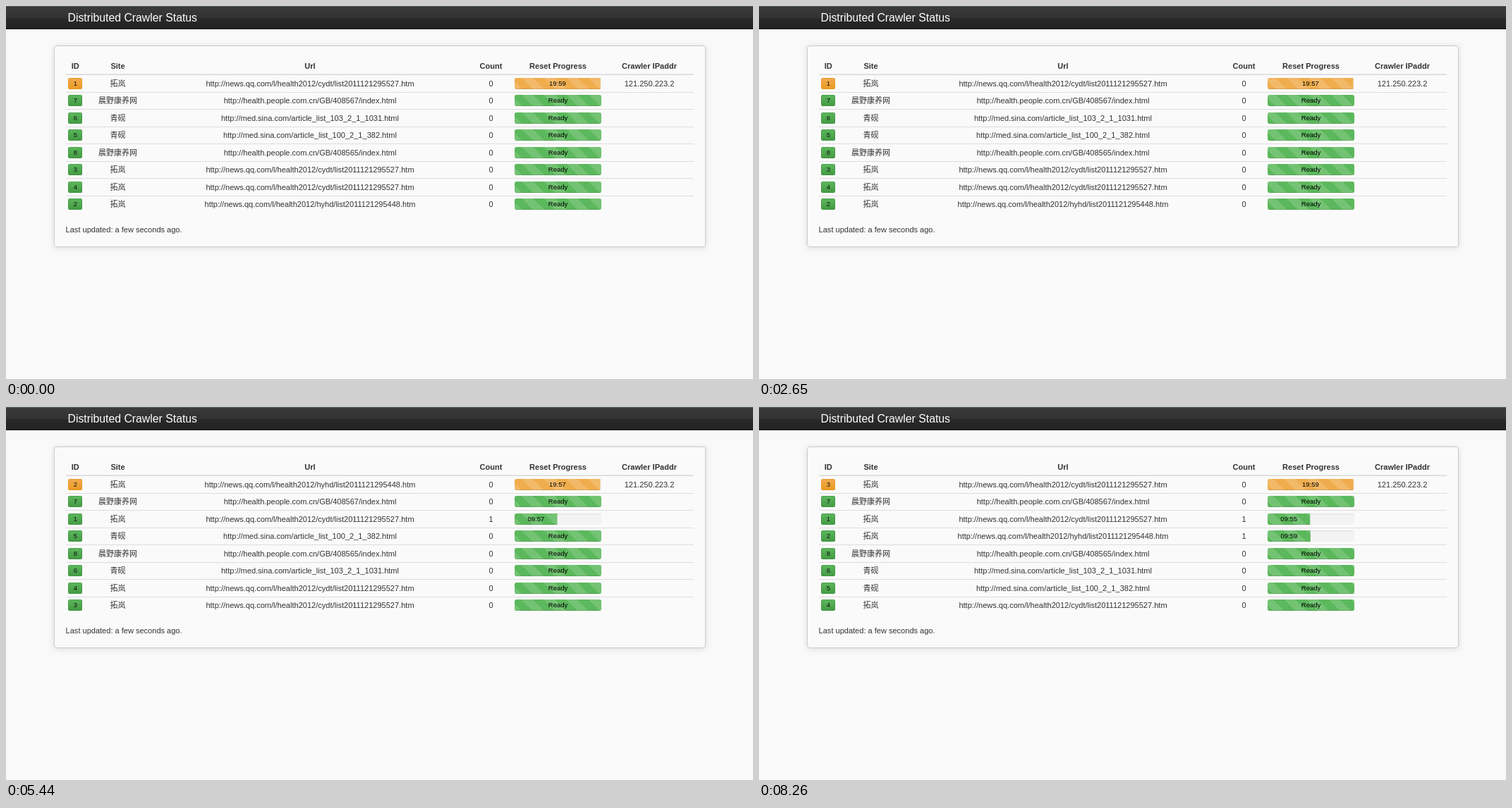
Animation, 1059 px wide and 529 px high, one loop 8360 ms. Source, as an HTML page with a canvas:

```html
<!DOCTYPE html>
<html lang="en">
<head>
<meta charset="utf-8">
<title>Distributed Crawler Status</title>
<style>
html, body { margin: 0; width: 100%; height: 100%; overflow: hidden; background: #f9f9f9; }
canvas { display: block; }
</style>
</head>
<body>
<canvas id="stage" width="1059" height="529"></canvas>
<script>
const ctx = document.getElementById('stage').getContext('2d');
const LOOP = 8360;
const FACE = '"Liberation Sans", Arial, "Noto Sans CJK SC", "Noto Sans CJK", sans-serif';
const COL = { id: 98.3, site: 158.5, url: 431, count: 687.5, bar: 782.5, ip: 912 };
const BAR = { x: 721, w: 123, h: 16 };
const TILE = 31.6;          // stripe period in px
const STRIPE_MS = 1800;     // time to travel one period
const STRIPE_START = 0.33;
const GROW_MS = 540;        // bar width transition

const GREEN = { base: '#5cb85c', low: '#449a44', edge: '#3e8f3e' };
const ORANGE = { base: '#f0ad4e', low: '#eb9a22', edge: '#e0901a' };

const news = path => ['拓岚', 'http://news.qq.com/l/health2012/' + path + '.htm'];
const health = n => ['晨野康养网', `http://health.people.com.cn/GB/${n}/index.html`];
const med = path => ['青砚', `http://med.sina.com/article_list_${path}.html`];
const JOBS = {
  1: news('cydt/list2011121295527'),
  2: news('hyhd/list2011121295448'),
  3: news('cydt/list2011121295527'),
  4: news('cydt/list2011121295527'),
  5: med('100_2_1_382'),
  6: med('103_2_1_1031'),
  7: health(408567),
  8: health(408565)
};

// Each poll: start time, row order, seconds left by job id
const ORDER_A = [1, 7, 6, 5, 8, 3, 4, 2];
const ORDER_B = [2, 7, 1, 5, 8, 6, 4, 3];
const ORDER_C = [3, 7, 1, 2, 8, 6, 5, 4];
const POLLS = [
  { at: 0, order: ORDER_A, left: { 1: 1199 } },
  { at: 1290, order: ORDER_A, left: { 1: 1197 } },
  { at: 3090, order: ORDER_B, left: { 2: 1199, 1: 599 } },
  { at: 4890, order: ORDER_B, left: { 2: 1197, 1: 597 } },
  { at: 6690, order: ORDER_C, left: { 3: 1199, 1: 595, 2: 599 } }
];

// CSS "ease": cubic-bezier(.25, .1, .25, 1)
function ease(x) {
  if (x <= 0) return 0;
  if (x >= 1) return 1;
  const curve = (a, b, u) => 3 * a * u * (1 - u) ** 2 + 3 * b * u * u * (1 - u) + u ** 3;
  let lo = 0, hi = 1;
  for (let i = 0; i < 20; i++) {
    const mid = (lo + hi) / 2;
    if (curve(0.25, 0.25, mid) < x) lo = mid; else hi = mid;
  }
  return curve(0.1, 1, lo);
}

function text(str, x, y, size = 11.04, color = '#333', weight = '', align = 'center') {
  ctx.font = `${weight} ${size}px ${FACE}`;
  ctx.fillStyle = color;
  ctx.textAlign = align;
  ctx.fillText(str, x, y);
}

function rect(x, y, w, h, fill) {
  ctx.fillStyle = fill;
  ctx.fillRect(x, y, w, h);
}

function roundPath(x, y, w, h, r) {
  ctx.beginPath();
  ctx.roundRect(x, y, w, h, r);
}

function fade(y0, y1, from, to) {
  const g = ctx.createLinearGradient(0, y0, 0, y1);
  g.addColorStop(0, from);
  g.addColorStop(1, to);
  return g;
}

function drawPage() {
  rect(0, 0, 1059, 529, '#f9f9f9');
  rect(0, 0, 1059, 17, fade(0, 17, '#3b3b3b', '#323232'));
  rect(0, 17, 1059, 16, fade(17, 33, '#292929', '#222'));
  rect(0, 0, 1059, 1, '#56666d');
  rect(0, 32, 1059, 1, '#101010');
  text('Distributed Crawler Status', 87.5, 22, 15.8, '#fff', '', 'left');

  ctx.save();
  ctx.shadowColor = 'rgba(0,0,0,.12)';
  ctx.shadowBlur = 7;
  ctx.shadowOffsetY = 1;
  roundPath(68, 56, 924, 286, 4);
  ctx.fillStyle = '#fafafa';
  ctx.fill();
  ctx.restore();
  roundPath(68.5, 56.5, 923, 285, 3.5);
  ctx.strokeStyle = '#ccc';
  ctx.lineWidth = 1;
  ctx.stroke();

  const heads = { id: 'ID', site: 'Site', url: 'Url', count: 'Count', bar: 'Reset Progress', ip: 'Crawler IPaddr' };
  for (const key in heads) text(heads[key], COL[key], 89, 11.04, '#333', 'bold');
  rect(85, 96.5, 890, 1.5, '#d9d9d9');
  for (let i = 1; i < 8; i++) rect(85, Math.floor(97.8 + 24.5 * i), 890, 1, '#ddd');
  text('Last updated: a few seconds ago.', 84.6, 321, 11.04, '#333', '', 'left');
}

function drawBadge(id, y, tone) {
  roundPath(88, y, 20, 16, 2.5);
  ctx.fillStyle = tone.edge;
  ctx.fill();
  roundPath(88.6, y + 0.6, 18.8, 14.8, 2);
  ctx.fillStyle = fade(y, y + 16, tone.base, tone.low);
  ctx.fill();
  text(id, COL.id, y + 11, 9.5, '#111');
}

function drawBar(label, width, y, tone, shift) {
  ctx.save();
  roundPath(BAR.x, y, BAR.w, BAR.h, 3);
  ctx.clip();
  rect(BAR.x, y, BAR.w, BAR.h, '#f3f3f3');
  rect(BAR.x, y, BAR.w, 3, fade(y, y + 3, '#e4e4e4', '#f3f3f3'));

  ctx.beginPath();
  ctx.rect(BAR.x, y, width, BAR.h);
  ctx.clip();
  rect(BAR.x, y, width, BAR.h, tone.base);
  ctx.fillStyle = 'rgba(255,255,255,.15)';
  for (let x = BAR.x + shift - 2 * TILE; x < BAR.x + width; x += TILE) {
    ctx.beginPath();
    ctx.moveTo(x, y);
    ctx.lineTo(x + TILE / 2, y);
    ctx.lineTo(x + TILE / 2 + BAR.h, y + BAR.h);
    ctx.lineTo(x + BAR.h, y + BAR.h);
    ctx.fill();
  }
  rect(BAR.x, y + BAR.h - 1, width, 1, 'rgba(0,0,0,.12)');
  ctx.restore();
  text(label, BAR.x + width / 2, y + 11, 9.5, '#000');
}

function clock(sec) {
  const two = n => String(n).padStart(2, '0');
  return two(Math.floor(sec / 60)) + ':' + two(sec % 60);
}

function barWidth(poll, row) {
  const left = poll.left[poll.order[row]];
  return left === undefined ? BAR.w : left / 1200 * (BAR.w - 1);
}

function draw(t) {
  const now = POLLS.findLastIndex(p => p.at <= t);
  const poll = POLLS[now];
  const before = POLLS[Math.max(0, now - 1)];
  const grown = ease((t - poll.at) / GROW_MS);
  const phase = STRIPE_START - t / STRIPE_MS;
  const shift = (phase - Math.floor(phase)) * TILE;

  drawPage();
  poll.order.forEach((id, row) => {
    const y = Math.floor(102 + 24.5 * row);
    const base = y + 12;
    const tone = row ? GREEN : ORANGE;
    const [site, url] = JOBS[id];
    const left = poll.left[id];
    const from = barWidth(before, row);
    const width = from + (barWidth(poll, row) - from) * grown;

    drawBadge(id, y, tone);
    text(site, COL.site, base);
    text(url, COL.url, base);
    text(row && left !== undefined ? 1 : 0, COL.count, base);
    drawBar(left === undefined ? 'Ready' : clock(left), width, y, tone, shift);
    if (!row) text('121.250.223.2', COL.ip, base);
  });
}

const start = performance.now();
function tick() {
  draw((performance.now() - start) % LOOP);
  requestAnimationFrame(tick);
}
tick();
</script>
</body>
</html>
```
